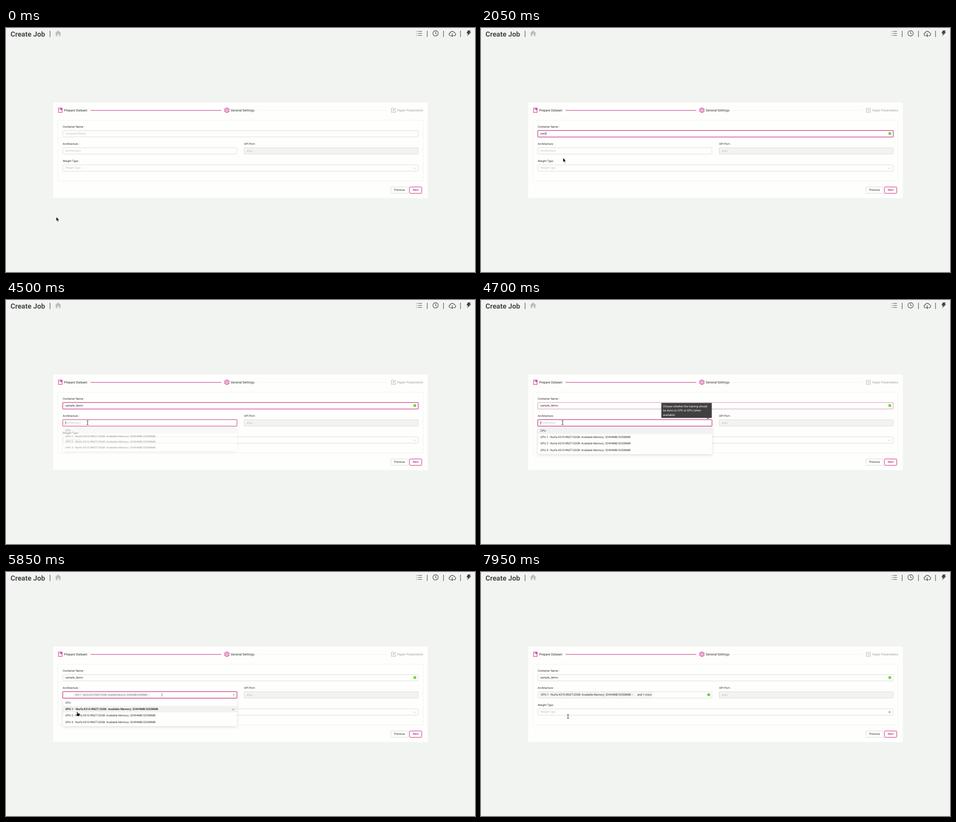
An HTML page for the animation above (8000 ms loop, 1035x541 px).

```html
<!DOCTYPE html>
<html lang="en">
<head>
<meta charset="utf-8">
<title>Create Job</title>
<style>
html, body { margin: 0; width: 100%; height: 100%; overflow: hidden; background: #f2f4f2; }
svg { display: block; width: 1035px; height: 541px; }
text { font-family: Roboto, sans-serif; font-size: 6.22px; fill: #2c2c2c; text-rendering: geometricPrecision; white-space: pre; }
.title { font-size: 15.55px; font-weight: 700; fill: #484848; }
.step { font-size: 7.15px; }
.hint { fill: #bdbebc; }
.tip text { fill: #fff; }
.box { fill: #fefffc; stroke: #dbdcd9; }
.pink { stroke: #c41d7f; fill: none; }
.dark { stroke: #444; fill: none; }
.bold { font-weight: 700; }
</style>
</head>
<body>
<svg id="stage" viewBox="0 0 1035 541" xmlns="http://www.w3.org/2000/svg"></svg>
<script>
const LOOP = 8000, STEP = 50;
const stage = document.getElementById('stage');
const $ = id => document.getElementById(id);

const text = (x, y, s, cls = '', id = '') =>
  `<text x="${x}" y="${y}" class="${cls}"${id && ` id="${id}"`}>${s}</text>`;
const rect = (x, y, w, h, attrs) => `<rect x="${x}" y="${y}" width="${w}" height="${h}" ${attrs}/>`;
const path = (d, attrs) => `<path d="${d}" ${attrs}/>`;
const field = (x, y, w, attrs = '') => rect(x, y, w, 14, `class="box" rx="1" ${attrs}`);
const focusRing = (id, x, y, w) => `<g id="${id}" class="pink">
  ${rect(x - .5, y - .5, w + 1, 15, 'rx="1.5" stroke-width="2" opacity=".3"')}
  ${rect(x, y, w, 14, 'rx="1" stroke-width="1" opacity=".8"')}</g>`;
const check = id => `<g id="${id}"><circle r="3.1" fill="#56ca2c"/>
  ${path('M-1.5 .1L-.4 1.2L1.5-1', 'fill="none" stroke="#fff" stroke-width=".75"')}</g>`;
const tooltip = (id, x, y, w, lines) => {
  const h = lines.length * 9.3 + 5.2, ax = x + w - 8.5;
  return `<g id="${id}" class="tip">${rect(x, y, w, h, 'rx="1" fill="#404040"')}
    ${path(`M${ax - 2.7} ${y + h}h5.4L${ax} ${y + h + 2.6}z`, 'fill="#404040"')}
    ${lines.map((s, i) => text(x + 3.7, y + 9.6 + i * 9.3, s)).join('')}</g>`;
};

const gpu = n => `GPU ${n} - Nurfa K310-RNZT-32GB- Available Memory: 32494MB/32508MB`;
const options = ['CPU', gpu(1), gpu(2), gpu(3)];
const rowY = i => 283 + i * 14.1;

const gear = Array.from({ length: 24 }, (_, i) => {
  const a = (i - .5) * Math.PI / 12, r = i % 4 < 2 ? 5.4 : 4.1;
  return `${(487.5 + r * Math.sin(a)).toFixed(2)} ${(182.4 - r * Math.cos(a)).toFixed(2)}`;
}).join('L');

const header = `
  ${text(10, 19, 'Create Job', 'title')}
  ${path('M97.2 6V20M929.5 6V20M965.5 6V20M1003 6V20', 'class="dark" stroke-width="1.1"')}
  ${path('M115 5.2L122 11.7H120.2V18H116.8V13.4H113.2V18H109.8V11.7H108z', 'fill="#bcbdbc"')}
  ${path('M909.5 7.5H918M909.5 12H918M909.5 16.5H918M906 7.5H907.6M906 12H907.6M906 16.5H907.6', 'class="dark" stroke-width="1.2"')}
  <circle cx="948" cy="11.8" r="5.9" class="dark" stroke-width="1.2"/>
  ${path('M948 8V12.2L950.7 13.7', 'class="dark" stroke-width="1.1"')}
  ${path('M981.3 17.2H980.5A3.4 3.4 0 0 1 980.3 10.6A4.8 4.8 0 0 1 989.3 10.4A3.4 3.4 0 0 1 988.8 17.2H988M984.7 11.5V18.5M982.4 16.4L984.7 18.8L987 16.4', 'class="dark" stroke-width="1.2"')}
  ${path('M1019 5.5H1025.6L1023.4 9.4H1026.5L1017.6 18L1019.8 12.3H1016.3z', 'fill="#444"')}`;

const card = `
  ${rect(104, 165, 827, 212, 'fill="#fefffc"')}
  ${rect(114.5, 204.5, 806, 135, 'rx="1" fill="none" stroke="#f1f2ef"')}
  ${path('M116 177.5H123.7V187.3H116zM120 177.5V181.2L121.4 180.2L122.7 181.2V177.5', 'class="pink" stroke-width="1.1"')}
  ${text(128.2, 185, 'Prepare Dataset', 'step')}
  ${path('M186.5 182.7H475', 'class="pink" stroke-width="1.1"')}
  ${path(`M${gear}z`, 'class="pink" stroke-width="1.1" stroke-linejoin="round"')}
  <circle cx="487.5" cy="182.4" r="1.9" class="pink"/>
  ${text(496, 185, 'General Settings', 'step')}
  ${path('M554.5 182.7H842', 'stroke="#f3f4f1"')}
  ${path('M855.5 178.2H850.5V187H859.2V182.5M853.7 184L854 182.2L858.6 177.6L860 179L855.4 183.6z', 'fill="none" stroke="#a6a7a5" stroke-width=".9"')}
  <g opacity=".45">${text(863.4, 185, 'Hyper Parameters', 'step')}</g>
  ${text(125.3, 221.2, 'Container Name :')}
  ${text(125.3, 259.2, 'Architecture :')}
  ${text(525.5, 259.2, 'API Port :')}
  ${text(125.3, 297.4, 'Weight Type :')}
  ${field(125.5, 227.5, 784)}
  ${field(125.5, 265.5, 384)}
  ${field(525.5, 265.5, 384, 'style="fill:#f3f4f1"')}
  ${field(125.5, 303.5, 784)}
  ${text(531, 274.5, '4261', 'hint')}
  ${text(131, 312.4, 'Weight Type', 'hint')}
  ${path('M899.3 309.8L901.5 312.4L903.7 309.8', 'id="chevron" fill="none" stroke="#b5b6b4" stroke-width=".8"')}
  <g id="clear"><circle cx="901.6" cy="310.8" r="2.7" fill="#c3c4c2"/>
    ${path('M900.7 309.9L902.5 311.7M902.5 309.9L900.7 311.7', 'stroke="#fff" stroke-width=".5"')}</g>
  ${rect(849.5, 352.5, 38, 14, 'class="box" rx="1"')}
  ${text(856.6, 361.2, 'Previous')}
  ${rect(890.5, 352.5, 27, 14, 'class="pink" rx="1"')}
  <text x="897.6" y="361.2" style="fill:#c41d7f;stroke:#c41d7f;stroke-width:.12">Next</text>`;

const dynamic = `
  ${focusRing('nameFocus', 125.5, 227.5, 784)}
  ${focusRing('archFocus', 125.5, 265.5, 384)}
  ${text(131, 236.2, 'Container Name', 'hint', 'nameHint')}
  ${text(131, 236.2, '', '', 'name')}
  ${text(131, 274.4, 'Architecture', 'hint', 'archHint')}
  ${check('nameCheck')}${check('archCheck')}
  <g id="tag1">${rect(128.5, 267, 210.5, 11, 'rx="1" fill="#f5f6f3" stroke="#eeefec" stroke-width=".7"')}
    ${text(132, 274.4, gpu(1))}
    ${path('M333.7 270.9L336.3 273.5M336.3 270.9L333.7 273.5', 'stroke="#999" stroke-width=".5"')}</g>
  <g id="tag2">${rect(342.3, 267, 36.5, 11, 'rx="1" fill="#f5f6f3" stroke="#eeefec" stroke-width=".7"')}
    ${text(345.2, 274.4, 'and 1 more')}</g>
  ${rect(0, 0, .7, 7.4, 'id="caret" fill="#222"')}
  <g id="menu">
    ${rect(125.5, 281, 384.3, 60.7, 'rx="1" fill="#fefffc" style="filter:drop-shadow(0 2px 3px #0002)"')}
    ${options.map((s, i) => rect(125.5, rowY(i), 384.3, 14.1, `id="row${i}"`) +
      text(131, rowY(i) + 9.2, s, '', `opt${i}`) +
      path(`M499 ${rowY(i) + 7.1}l1.8 1.9l3-3.7`, `id="tick${i}" class="pink" stroke-width=".9"`)).join('')}
  </g>
  ${tooltip('nameTip', 798, 200, 111, ['The given name used to identify the', 'training job and the resulting model'])}
  ${tooltip('archTip', 398, 228.3, 111.3, ['Choose whether the training should', 'be done on CPU or GPU (when', 'available)'])}
  <g id="cursor">
    ${path('M0 0V9.2L2.1 7.3L3.6 10.8L5.2 10.1L3.7 6.7H6.6z', 'id="arrow" fill="#000" stroke="#fff" stroke-width=".6"')}
    ${path('M-2-4.2Q-.3-4.2 0-3.6Q.3-4.2 2-4.2M0-3.6V3.8M-2 4.4Q-.3 4.4 0 3.8Q.3 4.4 2 4.4', 'id="beam" fill="none" stroke="#111" stroke-width=".9"')}
    ${path('M-.4 0Q.8-.4 1.1 .8L1.5 3L5 3.8Q6.3 4.2 5.9 5.8L5 9.3H.4L-2.2 5.9Q-1.9 4.8 -.7 5.4L0 6L-.9 1Q-1 .3-.4 0z', 'id="hand" fill="#000" stroke="#fff" stroke-width=".5"')}
  </g>`;

stage.innerHTML = header + card + dynamic;

// time, x, y, pointer shape from then on
const moves = [
  [0, 111, 419, 'arrow'], [450, 111, 419, 'arrow'], [850, 150, 236, 'beam'],
  [1000, 153, 236, 'beam'], [1100, 160, 248, 'arrow'], [1250, 178, 266, 'arrow'],
  [1300, 178, 266, 'arrow'], [1500, 181, 288, 'arrow'], [4100, 181, 288, 'arrow'],
  [4350, 180, 272, 'beam'], [4750, 180, 272, 'beam'], [4800, 179, 286, 'hand'],
  [4950, 171, 379, 'arrow'], [5000, 169, 381, 'arrow'], [5250, 160, 338, 'hand'],
  [5500, 157, 310, 'hand'], [6350, 157, 310, 'hand'], [6450, 159, 317, 'hand'],
  [6900, 159, 317, 'hand'], [7100, 171, 362, 'arrow'], [7200, 177, 377, 'arrow'],
  [7450, 177, 377, 'arrow'], [7750, 190, 325, 'arrow'], [7850, 191, 322, 'beam'],
  [7950, 192, 320.5, 'beam'], [LOOP, 192, 320.5, 'beam']
];
const word = 'sample_demo';
const keys = [1750, 1900, 2050, 2250, 2400, 2500, 2900, 3150, 3300, 3400, 3550];
// time, highlighted row
const hovers = [[0, 0], [4850, 1], [4900, 2], [4950, 3], [5400, 2], [5450, 1], [6450, 2], [6950, 3]];

const ramp = (t, a, b) => Math.min(1, Math.max(0, (t - a) / (b - a)));
const ease = k => k * k * (3 - 2 * k);
const out = k => 1 - (1 - k) ** 3;
const pulse = (t, a, b, c, d) => out(ramp(t, a, b)) * (1 - ease(ramp(t, c, d)));
const alpha = (id, v) => $(id).setAttribute('opacity', v);
const zoom = (id, x, y, s, home = true) =>
  $(id).setAttribute('transform', `translate(${x} ${y}) scale(${s})` + (home ? ` translate(${-x} ${-y})` : ''));

function drawCursor(t) {
  const i = Math.max(0, moves.findIndex(m => m[0] > t) - 1);
  const [t0, x0, y0, kind] = moves[i], [t1, x1, y1] = moves[i + 1];
  const k = ease(ramp(t, t0, t1));
  zoom('cursor', x0 + (x1 - x0) * k, y0 + (y1 - y0) * k, 1, false);
  for (const id of ['arrow', 'beam', 'hand']) alpha(id, +(id === kind));
}

function drawCaret(t) {
  const inName = t >= 950 && t < 4450;
  const x = inName ? 131 + $('name').getComputedTextLength() : t < 5850 ? 131 : 343.8;
  $('caret').setAttribute('x', x);
  $('caret').setAttribute('y', inName ? 230.4 : 268.8);
  alpha('caret', +(inName || (t >= 4450 && t < 6500)));
}

function drawMenu(t) {
  const open = pulse(t, 4450, 4700, 7250, 7450);
  const active = hovers.findLast(h => h[0] <= t)[1];
  const picked = { 1: t >= 5850, 2: t >= 6500 };
  alpha('menu', open);
  $('menu').setAttribute('transform', `translate(0 ${281 * (.2 - .2 * open)}) scale(1 ${.8 + .2 * open})`);
  options.forEach((_, i) => {
    $('row' + i).setAttribute('fill', i === active ? '#f2f2f0' : picked[i] ? '#fae1e8' : 'none');
    $('opt' + i).setAttribute('class', picked[i] ? 'bold' : '');
    alpha('tick' + i, +!!picked[i]);
  });
}

function draw(t) {
  const typed = keys.filter(k => k <= t).length;
  $('name').textContent = word.slice(0, typed);
  alpha('nameHint', +!typed);
  alpha('archHint', +(t < 5850));
  alpha('nameFocus', pulse(t, 900, 1150, 4450, 4850));
  alpha('archFocus', pulse(t, 4400, 4650, 7250, 7550));
  alpha('nameTip', pulse(t, 900, 1050, 1350, 1500));
  alpha('archTip', pulse(t, 4500, 4650, 4900, 5050));
  zoom('nameCheck', 902.2, 234, out(ramp(t, 1750, 2100)), false);
  zoom('archCheck', 502.6, 272.2, t < 5850 ? 0 : .45 + .55 * out(ramp(t, 5850, 6150)), false);
  zoom('tag1', 233.5, 272.4, .8 + .2 * out(ramp(t, 5850, 6150)));
  alpha('tag1', t < 5850 ? 0 : .75 + .25 * ramp(t, 5850, 6100));
  zoom('tag2', 360.5, 272.4, .8 + .2 * out(ramp(t, 6500, 6750)));
  alpha('tag2', t < 6500 ? 0 : .75 + .25 * ramp(t, 6500, 6700));
  alpha('chevron', +(t < 7900));
  alpha('clear', +(t >= 7900));
  drawMenu(t);
  drawCaret(t);
  drawCursor(t);
}

const start = performance.now();
function tick() {
  const t = (performance.now() - start) % LOOP;
  draw(Math.floor(t / STEP) * STEP);
  requestAnimationFrame(tick);
}
tick();
</script>
</body>
</html>
```
